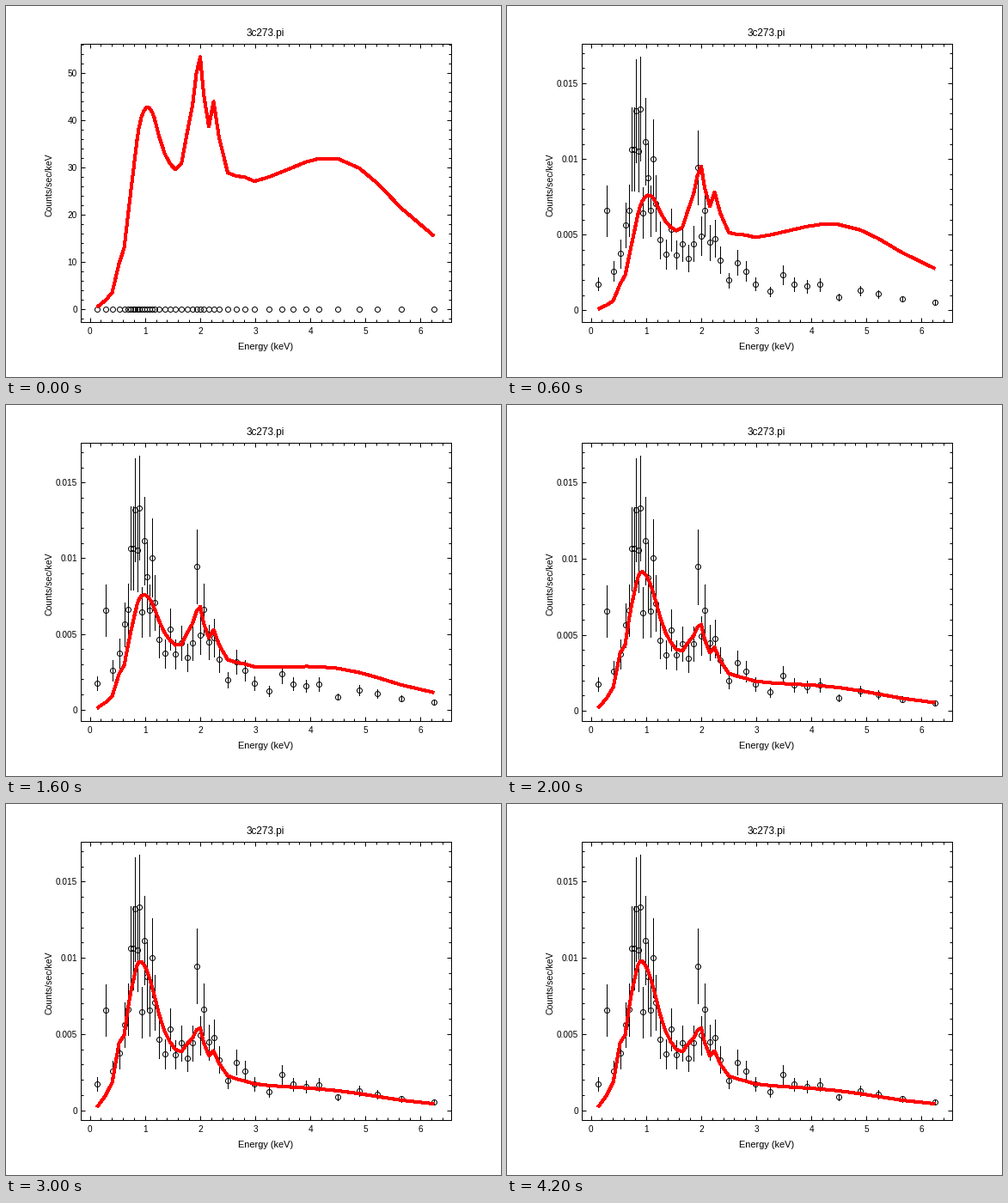
A matplotlib script that plays this animation: 576 px wide and 432 px high, repeating every 4400 ms.

```python
import numpy as np
import matplotlib.pyplot as plt
from matplotlib.animation import FuncAnimation
from matplotlib.ticker import AutoMinorLocator, FuncFormatter, MultipleLocator

W, H, DPI = 576, 432, 72
FRAMES, INTERVAL = 22, 200
LEFT, RIGHT, TOP, BOTTOM = 86.5, 517.5, 44.5, 367.5
PAD = 0.05
REL_ERR = 0.258

plt.rcParams.update({
    "font.family": "Liberation Sans",
    "font.size": 10,
    "axes.linewidth": 1,
})

energy = np.array([
    .132, .288, .405, .53, .623, .686, .74, .787, .818, .857, .888,
    .935, .982, 1.029, 1.075, 1.13, 1.169, 1.254, 1.356, 1.449, 1.551,
    1.66, 1.761, 1.862, 1.932, 2.002, 2.065, 2.158, 2.244, 2.345, 2.501,
    2.657, 2.805, 2.984, 3.249, 3.483, 3.693, 3.927, 4.153, 4.496, 4.885,
    5.213, 5.649, 6.241])

counts = 1e-4 * np.array([
    17.4, 65.7, 25.9, 37.3, 56.3, 66.2, 106.5, 106.5, 132.1, 105.4, 133.2,
    64.5, 111.6, 87.8, 65.7, 100.3, 70.8, 46.4, 37, 53.2, 36.7,
    44.1, 34.4, 44.1, 94.6, 49.2, 66.2, 44.7, 47.5, 33.3, 19.7,
    31.6, 25.9, 17.4, 12.3, 23.4, 17.1, 15.7, 16.9, 8.6, 12.9,
    10.6, 7.5, 5.2])

# Instrument response: the model for a flat unit spectrum.
response = np.array([
    .42, 1.9, 3.5, 9.7, 13, 19.4, 24.7, 29.2, 32.3, 36, 38.4,
    40.7, 42.1, 42.8, 42.7, 41.8, 40.5, 36.7, 33, 30.9, 29.6,
    30.8, 37.2, 43.2, 50, 53.5, 45.5, 38.7, 44, 36.3, 28.9,
    28.2, 28, 27.1, 28, 29.1, 30.1, 31.2, 31.9, 31.9, 29.9,
    26.7, 21.4, 15.5])

# Photon index and amplitude after each fit step.
STEPS = [(0, 1), (0, 1.775e-4), (.49, 1.78e-4), (.98, 2.1e-4),
         (1.125, 2.21e-4), (1.135, 2.22e-4), (1.138, 2.222e-4),
         (1.138, 2.222e-4)]
NUDGE = 0.003


def model(frame):
    """Each step evaluates the fit, then nudges index and amplitude in turn."""
    step, trial = divmod(frame, 3)
    index, amp = STEPS[step]
    if trial == 1:
        index += NUDGE
    elif trial == 2:
        amp *= 1 + NUDGE
    return amp * response * np.maximum(energy, 0.47) ** -index


def padded(lo, hi):
    pad = PAD * (hi - lo)
    return lo - pad, hi + pad


fig = plt.figure(figsize=(W / DPI, H / DPI), dpi=DPI, facecolor="white")
ax = fig.add_axes([LEFT / W, 1 - BOTTOM / H,
                   (RIGHT - LEFT) / W, (BOTTOM - TOP) / H])
ax.set_xlim(padded(energy[0], energy[-1]))
ax.xaxis.set_major_locator(MultipleLocator(1))
for axis in (ax.xaxis, ax.yaxis):
    axis.set_minor_locator(AutoMinorLocator(5))
    axis.set_major_formatter(FuncFormatter(lambda v, _: f"{round(v, 6) + 0:g}"))
ax.tick_params(which="both", direction="in", top=True, right=True, width=1)
ax.tick_params(which="major", length=5)
ax.tick_params(which="minor", length=3)
ax.tick_params(axis="x", pad=6)
ax.tick_params(axis="y", pad=3.5)


def label(x, y, text, size, **kw):
    fig.text(x / W, 1 - y / H, text, size=size, ha="center", va="baseline", **kw)


label(301.5, 35, "3c273.pi", 11.8)
label(302, 400, "Energy (keV)", 11)
label(54, 208, "Counts/sec/keV", 10.5, rotation=90, rotation_mode="anchor")

low, high = counts * (1 - REL_ERR), counts * (1 + REL_ERR)
ax.vlines(energy, low, high, colors="black", lw=1, antialiased=False, zorder=2)
ax.plot(energy, counts, "o", ms=6, mfc="none", mec="black", mew=1,
        antialiased=False, zorder=3)
curve, = ax.plot([], [], color="red", lw=3, antialiased=False,
                 solid_joinstyle="round", solid_capstyle="butt", zorder=4)


def update(frame):
    y = model(frame)
    curve.set_data(energy, y)
    top = max(y.max(), high.max())
    ax.set_ylim(padded(min(y.min(), low.min()), top))
    ax.yaxis.set_major_locator(MultipleLocator(10 if top > 1 else 0.005))
    return curve,


update(0)
anim = FuncAnimation(fig, update, frames=FRAMES, interval=INTERVAL,
                     repeat=True, repeat_delay=0, blit=False)
plt.show()
```
